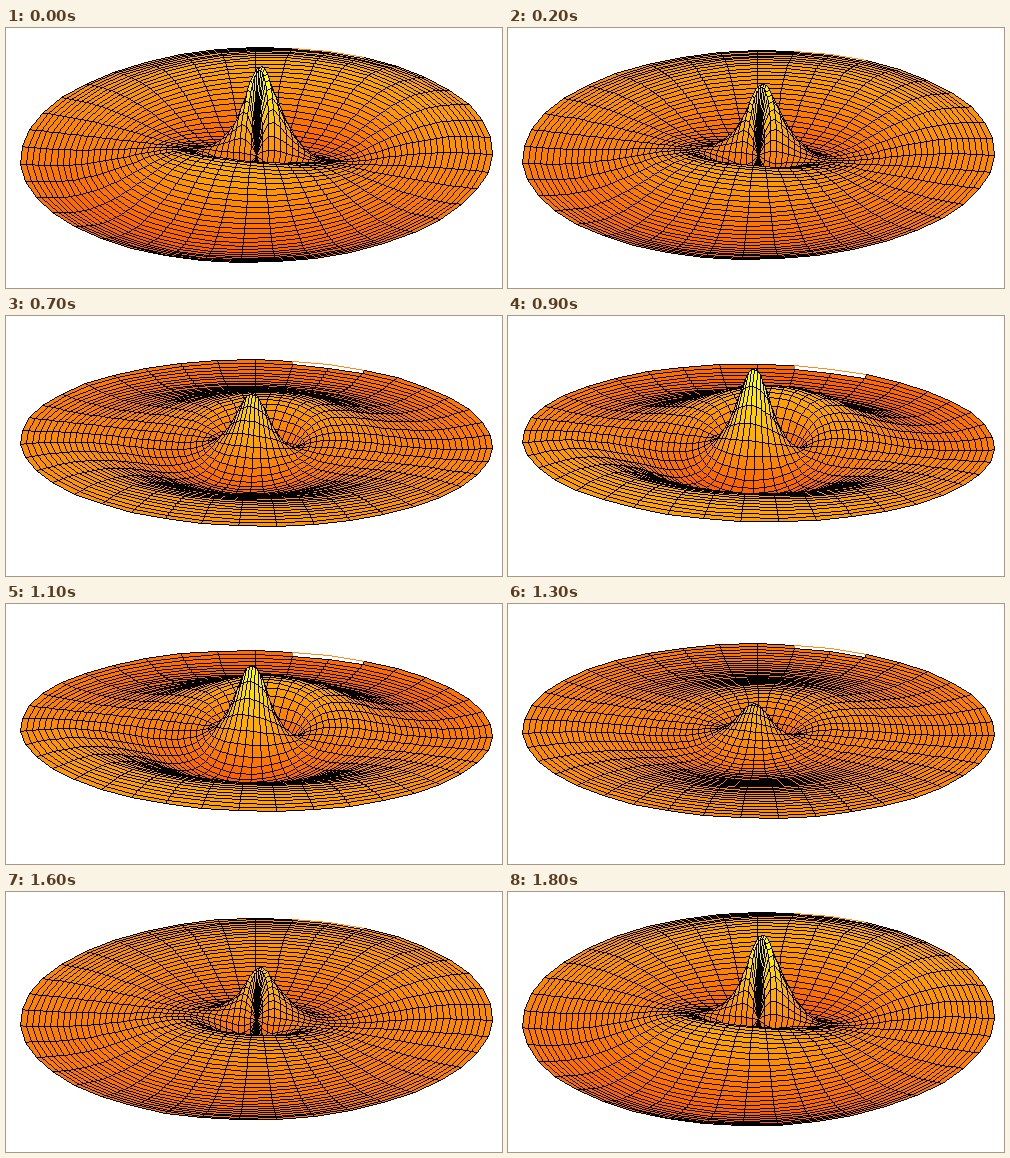
Recreate the animation shown at these times as an HTML page with a canvas. Size 496x260 px, loop 1900 ms.

```html
<!DOCTYPE html>
<html lang="en">
<head>
<meta charset="utf-8">
<title>Vibrating membrane</title>
<style>
html, body { margin: 0; width: 100%; height: 100%; overflow: hidden; background: #fff; }
canvas { display: block; width: 496px; height: 260px; }
</style>
</head>
<body>
<canvas id="stage" width="496" height="260"></canvas>
<script>
const ctx = document.getElementById('stage').getContext('2d');
const RINGS = 39, SECTORS = 39, STEPS = 19, STEP_MS = 100;
const CX = 250.5, CY = 126.6, RX = 236, RY = 93;
const TILT = RY / RX, COS_TILT = Math.sqrt(1 - TILT * TILT);
const TOP = Math.PI / 2 + 0.006;   // angle of the first radial line
const LEAN = 0.27;                 // turn of the nodal line

// Radial profile: radius, height in pixels
const PROFILE = [
  [0, 0], [.026, 54], [.051, 80], [.077, 81.5], [.103, 67], [.14, 42], [.2, 8], [.26, -15],
  [.33, -24], [.44, -18], [.57, .5], [.69, 14.5], [.8, 21.5], [.9, 20.5], [1, 15]
];

function slope(i) {
  const a = PROFILE[Math.max(i - 1, 0)];
  const b = PROFILE[Math.min(i + 1, PROFILE.length - 1)];
  return (b[1] - a[1]) / (b[0] - a[0]);
}

function profile(r) {
  let i = 0;
  while (i < PROFILE.length - 2 && r > PROFILE[i + 1][0]) i++;
  const [x0, y0] = PROFILE[i], [x1, y1] = PROFILE[i + 1];
  const w = x1 - x0, t = (r - x0) / w, s = 1 - t;
  return y0 * (1 + 2 * t) * s * s + slope(i) * w * t * s * s
    + y1 * t * t * (3 - 2 * t) - slope(i + 1) * w * t * t * s;
}

function vertex(ring, sector, swing) {
  const r = ring / RINGS;
  const phi = TOP - sector * 2 * Math.PI / SECTORS;
  const u = swing * profile(r) * Math.sin(phi + LEAN);
  const back = r * Math.sin(phi);
  return {
    x: Math.round(CX + RX * r * Math.cos(phi) - 0.5),
    y: Math.round(CY - RY * back - u),
    u,
    depth: u * TILT / COS_TILT - RX * back * COS_TILT
  };
}

// Crisp one-pixel line
function line(a, b, color) {
  const dx = b.x - a.x, dy = b.y - a.y;
  const n = Math.max(Math.abs(dx), Math.abs(dy));
  ctx.fillStyle = color;
  for (let i = 0; i <= n; i++) {
    const t = n ? i / n : 0;
    ctx.fillRect(Math.round(a.x + dx * t), Math.round(a.y + dy * t), 1, 1);
  }
}

function mean(points, key) {
  return points.reduce((sum, p) => sum + p[key], 0) / points.length;
}

function buildCells(swing) {
  const grid = [];
  for (let i = 0; i <= RINGS; i++) {
    grid.push([]);
    for (let j = 0; j <= SECTORS; j++) grid[i].push(vertex(i, j % SECTORS, swing));
  }
  const cells = [];
  for (let i = 0; i < RINGS; i++) {
    for (let j = 0; j < SECTORS; j++) {
      const points = [grid[i][j], grid[i][j + 1], grid[i + 1][j + 1], grid[i + 1][j]];
      const open = i === RINGS - 1 && (j === 1 || j === 2);
      cells.push({ points, open, depth: mean(points, 'depth') });
    }
  }
  return cells.sort((a, b) => a.depth - b.depth);
}

function drawCell({ points, open }) {
  const hue = Math.max(0, Math.min(59, 31 + mean(points, 'u') * 0.42));
  ctx.fillStyle = open ? '#fff' : `hsl(${hue}, 100%, 50%)`;
  ctx.beginPath();
  for (const p of points) ctx.lineTo(p.x + 0.5, p.y + 0.5);
  ctx.fill();
  if (open) {
    line(points[2], points[3], '#ff8c1a');
    return;
  }
  points.forEach((p, k) => line(p, points[(k + 1) % 4], '#000'));
}

function draw(step) {
  ctx.fillStyle = '#fff';
  ctx.fillRect(0, 0, 496, 260);
  buildCells(Math.cos(2 * Math.PI * step / STEPS)).forEach(drawCell);
}

const start = performance.now();
let shown = -1;

function tick() {
  const step = Math.floor((performance.now() - start) / STEP_MS) % STEPS;
  if (step !== shown) draw(shown = step);
  requestAnimationFrame(tick);
}
tick();
</script>
</body>
</html>
```
